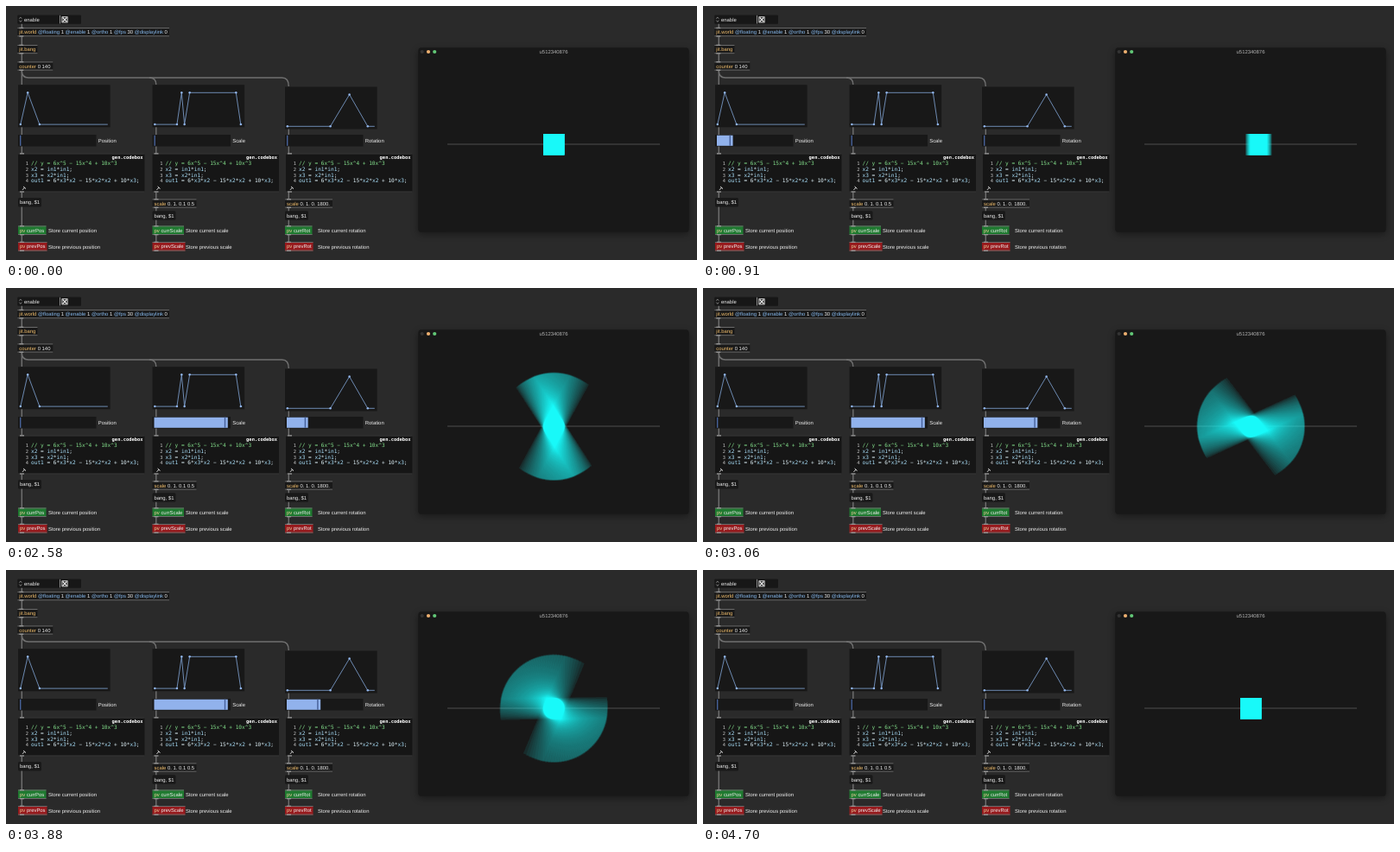
An HTML page with a canvas that plays this animation: 800 px wide and 294 px high, repeating every 4730 ms.

```html
<!DOCTYPE html>
<html lang="en">
<head>
<meta charset="utf-8">
<title>Motion blur patch</title>
<style>
html, body { margin: 0; width: 100%; height: 100%; overflow: hidden; background: #2a2a2a; }
#stage { position: absolute; left: 0; top: 0; width: 800px; height: 294px; overflow: hidden; }
svg, canvas { position: absolute; display: block; }
svg { left: 0; top: 0; }
canvas { left: 550px; top: 90px; }
text { font: 5.92px "Liberation Sans", Arial, sans-serif; fill: #eee; white-space: pre; text-rendering: geometricPrecision; }
.code { font: 6.14px "DejaVu Sans Mono", monospace; fill: #dff1f8; }
.head { font: bold 5.45px "DejaVu Sans Mono", monospace; fill: #fff; }
</style>
</head>
<body>
<div id="stage">
<svg id="art" width="800" height="294" viewBox="0 0 800 294"></svg>
<canvas id="view" width="230" height="140"></canvas>
</div>
<script>
const LOOP = 4730, STEPS = 141, SAMPLES = 51;
const UNIT = 123, CX = 634.3, CY = 160.3, TRAVEL = 82.3;
const art = document.getElementById('art');

const rect = (x, y, w, h, fill, extra = '') =>
  `<rect x="${x}" y="${y}" width="${w}" height="${h}" fill="${fill}" ${extra}/>`;
const span = (s, fill) => `<tspan fill="${fill}">${s}</tspan>`;
const text = (x, y, s, extra = '') => `<text x="${x}" y="${y}" ${extra}>${s}</text>`;
const cord = d => `<path d="${d}" fill="none" stroke="#707070" stroke-width="1.4"/>`;
const NAME = '#f0bd6c', ATTR = '#86b9ee';

// Patcher object: body with lighter strips at the top and bottom
function box(x, y, w, label, fill = '#191919', h = 10.2) {
  return rect(x, y, w, h, fill) +
    rect(x, y, w, 1, '#6b6b6b') + rect(x, y + h - 1, w, 1, '#6b6b6b') +
    rect(x + 2, y - .3, 5, 1.3, '#999') + rect(x + 2, y + h - 1, 5, 1.3, '#999') +
    text(x + 2, y + 7.2, label);
}

function message(x, y) {
  return rect(x, y, 27, 10.6, '#191919', 'rx="1.5"') + text(x + 2, y + 7.3, 'bang, $1');
}

// Breakpoints on the 0..140 counter
const columns = [
  { x: 14, code: 14, label: 'Position', name: 'Pos', word: 'position', gy: 91.3, note: 49, w: [32.5, 33.5],
    points: [[0, 0], [11.6, 1], [30.6, 0], [140, 0]] },
  { x: 169.5, code: 169.5, label: 'Scale', name: 'Scale', word: 'scale', gy: 91.3, note: 208, w: [36.5, 38],
    range: 'scale 0. 1. 0.1 0.5', rw: 51,
    points: [[0, 0], [35.5, 0], [43, 1], [47.6, 0], [55.9, 1], [130.3, 1], [137.9, 0], [140, 0]] },
  { x: 323, code: 324, label: 'Rotation', name: 'Rot', word: 'rotation', gy: 93.5, note: 361, w: [31.5, 32.5],
    range: 'scale 0. 1. 0. 1800.', rw: 55,
    points: [[0, 0], [68.94, 0], [99.54, 1], [128.9, 0], [140, 0]] }
];

function graph(c) {
  const p = c.points.map(([t, v]) => [c.x + 2.8 + t * 101 / 140, c.gy + 45.8 - v * 36.8]);
  return rect(c.x, c.gy, 106.6, 49, '#181818') +
    `<polyline points="${p.map(q => q.join()).join(' ')}" fill="none" stroke="#7d9fce" stroke-width=".85"/>` +
    p.slice(0, -1).map(q => `<circle cx="${q[0]}" cy="${q[1]}" r="1.25" fill="#91b5ea"/>`).join('');
}

function codebox(x) {
  const lines = ['// y = 6x^5 − 15x^4 + 10x^3', 'x2 = in1*in1;', 'x3 = x2*in1;',
    'out1 = 6*x3*x2 − 15*x2*x2 + 10*x3;'];
  const paint = s => s[0] === '/' ? span(s, '#84e08c')
    : s.replace(/\b(x\d|in1|out1)\b/g, m => span(m, '#a9e0fb'));
  return rect(x, 170.6, 146.5, 44.8, '#161616') +
    rect(x, 170.6, 146.5, .8, '#444') + rect(x, 214.6, 146.5, .8, '#444') +
    rect(x + 2, 170.2, 5, 1.3, '#999') + rect(x + 2, 214.4, 5, 1.3, '#999') +
    text(x + 144.6, 176.6, 'gen.codebox', 'class="head" text-anchor="end"') +
    lines.map((s, i) => {
      const y = 184.2 + i * 6.75;
      return text(x + 8.8, y, span(i + 1, '#c4c4c4'), 'class="code" style="font-size:5.4px"') +
        text(x + 15, y, paint(s), 'class="code"');
    }).join('') +
    `<path d="M${x + 5} 212.8l2.6-2.6m-1.5-1.2l2.9 2.6" stroke="#e8e8e8" stroke-width="1" fill="none"/>`;
}

function column(c, i) {
  const x = c.x, cx = x + 4.3;
  const pv = (kind, y, w, fill) =>
    box(x, y, w, span('pv ', '#edcf9b') + kind + c.name, fill, 10.6);
  return cord(`M${cx} 139V273`) + graph(c) +
    rect(x, 149, 90.5, 13.5, '#181818') +
    `<rect id="fill${i}" x="${x + 2}" y="149.7" height="12.1" fill="#91b2ec"/>` +
    `<rect id="mark${i}" y="149.7" width="1.4" height="12.1" fill="#46619a"/>` +
    text(x + 92.7, 157.8, c.label) +
    codebox(c.code) +
    (c.range ? box(x, 223.4, c.rw, c.range.replace('scale', span('scale', NAME))) + message(x, 237.2)
      : message(x, 222)) +
    pv('curr', 254.4, c.w[0], '#1f7a30') + text(c.note, 261.7, 'Store current ' + c.word) +
    pv('prev', 273, c.w[1], '#971a1d') + text(c.note, 280.5, 'Store previous ' + c.word);
}

const world = span('jit.world', NAME) +
  [['floating', 1], ['enable', 1], ['ortho', 1], ['fps', 30], ['displaylink', 0]]
    .map(([k, v]) => ' ' + span('@' + k, ATTR) + ' ' + v).join('');

art.innerHTML =
  '<defs><filter id="soft" x="-10%" y="-10%" width="120%" height="125%"><feGaussianBlur stdDeviation="4"/></filter></defs>' +
  rect(0, 0, 800, 294, '#2a2a2a') +
  cord('M18.3 20V91') + cord('M18.3 75Q18.3 83 26 83H166Q173.8 83 173.8 91') +
  cord('M166 83H319.5Q327.3 83 327.3 93') +
  rect(13.3, 10.4, 73.7, 10.4, '#171717', 'rx="1"') +
  '<path d="M15.4 14.7l1.4-1.8 1.4 1.8M15.4 16.6l1.4 1.8 1.4-1.8" stroke="#a8a8a8" stroke-width=".7" fill="none"/>' +
  text(21, 17.7, 'enable') + rect(62, 10.8, .8, 9.6, '#aaa') +
  rect(64.9, 12.7, 6.2, 6.2, '#111', 'stroke="#eee" stroke-width=".9"') +
  '<path d="M65.7 13.5l4.6 4.6m0-4.6l-4.6 4.6" stroke="#fff" stroke-width="1.1"/>' +
  box(13.3, 25.1, 175.7, world) +
  box(13.3, 45, 23.2, span('jit.bang', NAME)) +
  box(13.3, 64.4, 41, span('counter', NAME) + ' 0 140') +
  columns.map(column).join('') +
  rect(477, 51, 314, 213, '#000', 'rx="4" opacity=".4" filter="url(#soft)"') +
  rect(477.3, 48.3, 313.4, 213.4, '#181818', 'rx="3.5"') +
  [['#343434', 481.7], ['#eeb070', 489], ['#62c877', 496.2]]
    .map(([f, x]) => `<circle cx="${x}" cy="53" r="2.1" fill="${f}"/>`).join('') +
  text(634, 55, 'u512340876', 'text-anchor="middle" style="fill:#b4b4b4"') +
  rect(511, 159.6, 246, .8, '#5c5c5c');

const mix = (a, b, u) => a + (b - a) * u;
const ease = x => x * x * x * (6 * x * x - 15 * x + 10);

function sample(points, t) {
  const i = Math.max(1, points.findIndex(p => p[0] >= t));
  const [a, b] = [points[i - 1], points[i]];
  return mix(a[1], b[1], (t - a[0]) / (b[0] - a[0]));
}

function pose(n) {
  const [p, s, r] = columns.map(c => ease(sample(c.points, n)));
  return { x: p * UNIT, h: mix(.1, .5, s) * UNIT, turn: r * 10 * Math.PI };
}

const view = document.getElementById('view');
const ctx = view.getContext('2d', { willReadFrequently: true });

// Equal samples between two poses, then a gamma lift of the averaged coverage
function drawBlur(a, b) {
  const hi = Math.max(a.turn, b.turn), lo = Math.min(a.turn, b.turn);
  const half = .1 * UNIT;
  ctx.setTransform(1, 0, 0, 1, 0, 0);
  ctx.clearRect(0, 0, view.width, view.height);
  ctx.globalCompositeOperation = 'lighter';
  ctx.fillStyle = '#0ff';
  ctx.globalAlpha = 1 / SAMPLES;
  for (let i = 0; i < SAMPLES; i++) {
    const u = i / (SAMPLES - 1), h = mix(a.h, b.h, u);
    ctx.setTransform(1, 0, 0, 1, CX - 550 + mix(a.x, b.x, u), CY - 90);
    ctx.rotate(-mix(hi, lo, .75 * u + .25 * u ** 3));
    ctx.fillRect(-half, -h, 2 * half, 2 * h);
  }
  const img = ctx.getImageData(0, 0, view.width, view.height), d = img.data;
  for (let i = 0; i < d.length; i += 4) {
    if (!d[i + 3]) continue;
    d[i] = 24;
    d[i + 1] = d[i + 2] = 249;
    d[i + 3] = 255 * (d[i + 3] / 255) ** .6;
  }
  ctx.putImageData(img, 0, 0);
}

const sliders = columns.map((c, i) => ['fill', 'mark'].map(k => document.getElementById(k + i)));
let shown = -1;

function draw(ms) {
  const n = Math.round((ms % LOOP) / LOOP * STEPS) % STEPS;
  if (n === shown) return;
  shown = n;
  columns.forEach((c, i) => {
    const v = sample(c.points, n), [fill, mark] = sliders[i];
    fill.setAttribute('width', v > 0 ? v * TRAVEL + 3 : 0);
    mark.setAttribute('x', c.x + 2 + v * TRAVEL - (v > 0 ? 1 : 0));
  });
  drawBlur(pose((n + STEPS - 1) % STEPS), pose(n));
}

const start = performance.now();
function tick() {
  draw(performance.now() - start);
  requestAnimationFrame(tick);
}
tick();
</script>
</body>
</html>
```
